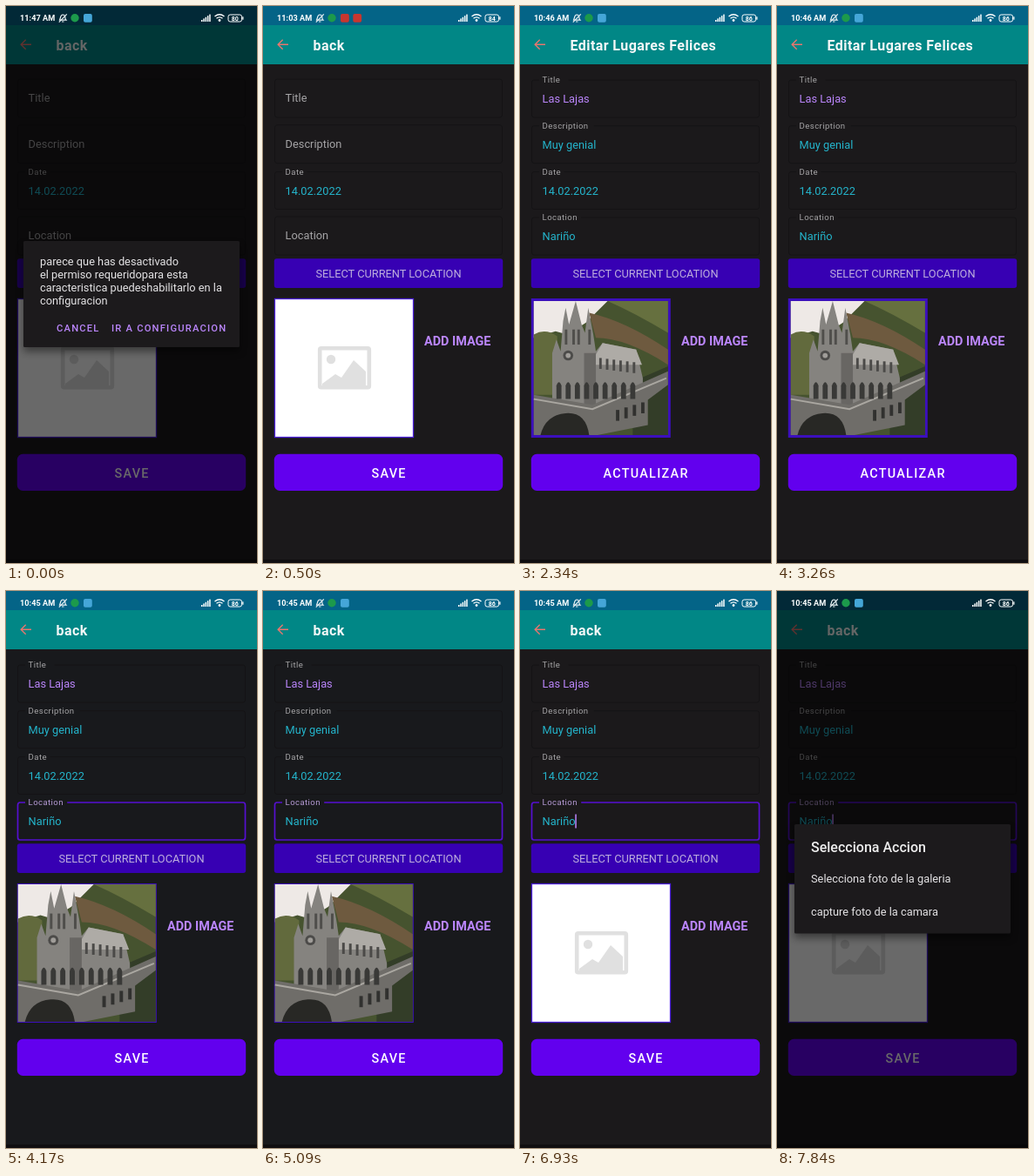
Animation, 288 px wide and 640 px high, one loop 8000 ms. Source, as an HTML page:

```html
<!DOCTYPE html>
<html lang="es">
<head>
<meta charset="utf-8">
<style>
html, body { margin: 0; width: 100%; height: 100%; overflow: hidden; background: #000; }
svg { display: block; }
#stage { width: 288px; height: 640px; font-family: Roboto, sans-serif; }
</style>
</head>
<body>
<svg id="stage" viewBox="0 0 288 640"></svg>
<script>
const LOOP = 8000;
const LILAC = '#bb86fc', CYAN = '#24b4cb', GREY = '#a5a4a6';

const text = (x, y, s, size = 12.8, fill = '#e4e3e5', extra = '') =>
  `<text x="${x}" y="${y}" font-size="${size}" fill="${fill}" ${extra}>${s}</text>`;
const rect = (x, y, w, h, fill, extra = '') =>
  `<rect x="${x}" y="${y}" width="${w}" height="${h}" fill="${fill}" ${extra}/>`;
const circle = (x, y, r, fill) => `<circle cx="${x}" cy="${y}" r="${r}" fill="${fill}"/>`;
const path = (d, fill, extra = '') => `<path d="${d}" fill="${fill}" ${extra}/>`;
const line = (d, stroke, width = 1) => path(d, 'none', `stroke="${stroke}" stroke-width="${width}"`);
const bold = 'font-weight="700"', medium = 'font-weight="500"';

function church() {
  let s = rect(0, 0, 160, 160, '#46532f')
    + path('M0 0H88L62 26 40 40 26 36 0 44Z', '#eee9e6')
    + path('M66 14Q110 24 160 58V76Q110 44 74 44Z', '#6e5a3f')
    + path('M88 0H160V38Q120 14 88 0Z', '#66703f')
    + path('M0 40Q14 32 28 42V112H0Z', '#626a3d')
    + path('M118 96L160 78V160H118Z', '#333d28')
    + path('M22 118V62L27 46 32 60 35 24 38 8 42 28 50 0 57 28 61 38 65 8 71 40 74 60 82 50 122 58 130 92V134H22Z', '#85837f')
    + path('M74 64L82 50 122 58 129 76H74Z', '#aeaba6')
    + path('M60 62H74V134H60Z', '#686663')
    + path('M0 112L70 124 160 84V100L136 118V148L76 160H0Z', '#6f6d69')
    + path('M8 160Q14 136 38 134T66 160Z', '#282825')
    + line('M0 117L70 129 158 92', '#aaa7a1', 2)
    + circle(41, 65, 6, '#4c4b49') + circle(41, 65, 3, '#a09d99');
  for (let i = 0; i < 9; i++)
    s += path(`M${27 + i * 11} 117v-16q3 -8 6 0v16z`, '#393937');
  for (let i = 0; i < 6; i++)
    s += rect(78 + i * 8, 68 + i, 3, 13, '#4b4a48');
  for (let i = 0; i < 4; i++)
    s += rect(98 + i * 10, 130 - i * 3, 4, 13, '#31312f');
  for (const x of [37, 46, 52, 65]) s += rect(x, 34, 3, 18, '#4f4e4b');
  return s;
}

const street = rect(0, 0, 56, 56, '#6b9ed2')
  + path('M4 10Q26 2 46 14L34 20Z', '#b4cfe8')
  + path('M0 24L30 25 34 15 40 22 56 19V44H0Z', '#dcdfe2')
  + path('M0 24L30 25 56 21V23L30 28 0 27Z', '#9c8d86')
  + path('M0 42L56 39V56H0Z', '#8d949c')
  + [6, 16, 26, 35, 44].map(x => rect(x, 31, 2.5, 8, '#868c94')).join('');

const harbour = rect(0, 0, 56, 56, '#3e80cb') + rect(0, 34, 56, 22, '#2d4f7d')
  + [0, 6, 11, 17, 23, 29, 35, 41, 47, 52].map((x, i) =>
      rect(x, 15 + (i * 7) % 13, 4, 24, i % 2 ? '#263d5d' : '#5d7fa8')).join('')
  + path('M0 41Q28 36 56 43V46Q28 40 0 45Z', '#8a7a70') + rect(0, 47, 56, 9, '#1e2f4b');

const statue = rect(0, 0, 56, 56, '#aabccd') + path('M0 32L18 27 38 34 56 28V56H0Z', '#65755a')
  + path('M0 45Q28 37 56 46V56H0Z', '#3f4c35')
  + path('M30 4h4v5h11v4H35l2 34H27l2-34H15V9h15z', '#f1f2f1');

const alley = rect(0, 0, 56, 56, '#d6e2ed')
  + path('M0 4L25 24V38L0 50Z', '#b8722e') + path('M56 2L32 24V38L56 50Z', '#9c4533')
  + path('M0 4L25 24V27L0 14Z', '#6d3a22') + path('M56 2L32 24V27L56 13Z', '#70402a')
  + path('M25 36H32L52 56H4Z', '#b9a084') + path('M0 40L25 34V38L0 54Z', '#276f7d')
  + path('M56 38L32 34V38L56 53Z', '#c99a38')
  + [4, 11, 18].map(x => rect(x, 22 + x / 4, 4, 12, '#5e3826') + rect(49 - x, 22 + x / 4, 4, 12, '#dcc38a')).join('');

const metro = rect(0, 0, 56, 56, '#d5dfe8') + path('M0 24Q28 16 56 22V56H0Z', '#7e9089')
  + [5, 12, 20, 28, 37, 45].map((x, i) => rect(x, 12 + (i * 5) % 9, 6, 24, i % 2 ? '#eceae5' : '#9ca4aa')).join('')
  + path('M0 35Q28 29 56 36V56H0Z', '#4e6248') + line('M4 56Q18 40 54 36', '#24282b', 7)
  + line('M4 53Q18 38 54 34', '#b9bdbd', 1.5);

const defs = `<defs>
  <clipPath id="disc"><circle cx="28" cy="28" r="28"/></clipPath>
  <g id="church">${church()}</g>
  <filter id="soft" x="-20%" y="-20%" width="140%" height="140%"><feGaussianBlur stdDeviation="5"/></filter>
</defs>`;

function status(time, charge, tray) {
  let s = text(16, 17.2, time, 9.2, '#fff', bold)
    + path('M61.5 16.2H69Q67.8 15 67.8 12.5Q67.3 10 65.2 10T62.6 13Z', 'none', 'stroke="#e8eef2" stroke-width="1.2"')
    + line('M60.8 18.6L69.8 9.3M64 18H66.5', '#e8eef2', 1.2) + circle(79, 13.8, 4.7, '#1c9a4b');
  tray.forEach((c, i) => s += rect(89 + i * 14.3, 9, 9.8, 9.8, c, 'rx="2"'));
  for (let i = 0; i < 5; i++)
    s += rect(224 + i * 2.3, 16 - i * 1.6, 1.5, 2 + i * 1.6, '#fff');
  return s + line('M239.5 12Q245 7.5 250.5 12M241.5 14.2Q245 11.4 248.5 14.2', '#fff', 1.3)
    + circle(245, 16.5, 1.4, '#fff')
    + rect(255, 10, 15.5, 8, 'none', 'rx="2.2" stroke="#fff"') + rect(271.3, 12.3, 1.2, 3.4, '#fff')
    + text(262.7, 16.6, charge, 7, '#fff', bold + ' text-anchor="middle"');
}

// Outlined input; the label floats into the border once there is a value.
function field(y, label, value, color, focus) {
  const w = label.length * 4.9 + 9;
  const edge = focus ? '#560fd2' : '#141315';
  if (!value)
    return rect(13.5, y - 1, 261, 44, 'none', `rx="3" stroke="${edge}"`) + text(25.6, y + 25.3, label, 12.8, GREY);
  return line(`M22 ${y}H16Q13.5 ${y} 13.5 ${y + 3}V${y + 40}Q13.5 ${y + 43} 16 ${y + 43}H272Q274.5 ${y + 43} 274.5 ${y + 40}V${y + 3}Q274.5 ${y} 272 ${y}H${22 + w}`, edge, focus ? 1.7 : 1)
    + text(25.6, y + 3.2, label, 9.6, focus ? '#b69bd6' : GREY, 'letter-spacing=".4"')
    + text(25.6, y + 26, value, 12.8, color);
}

const placeholder = rect(13.5, 336.5, 159, 159, '#fff', 'stroke="#4a1fd8" stroke-width="1.3"')
  + rect(65.2, 393.2, 56.6, 45, '#fff', 'rx="1.5" stroke="#e0e0e0" stroke-width="4.6"')
  + circle(78, 406, 5.2, '#e0e0e0')
  + path('M68 434L83 423 90 427 104 407 118 420V436H68Z', '#e0e0e0');

function photo(inset) {
  const k = (160 - 2 * inset) / 160;
  return rect(12.8, 336, 160, 160, '#3c0fbd')
    + `<use href="#church" transform="translate(${12.8 + inset} ${336 + inset}) scale(${k})"/>`;
}

function form(o) {
  const filled = o.filled;
  return rect(0, 0, 288, 640, o.bg || '#1b191b') + rect(0, 0, 288, 22, '#046487') + rect(0, 22, 288, 45, '#018786')
    + line('M29 44.3H17.5M22.7 38.8L17.2 44.3 22.7 49.8', '#e8766f', 1.4)
    + text(57.6, 50.6, o.title || 'back', 16, '#f4f7f7', bold + ' letter-spacing=".4"')
    + field(85, 'Title', filled && 'Las Lajas', LILAC)
    + field(137.7, 'Description', filled && 'Muy genial', CYAN)
    + field(190.5, 'Date', '14.02.2022', CYAN)
    + field(243, 'Location', filled && 'Nariño', CYAN, o.focus)
    + (o.caret ? rect(63.3, 256.5, 1.5, 16, LILAC) : '')
    + rect(12.8, 290.2, 262.4, 33.8, '#3700b3', 'rx="3"')
    + text(144, 312.2, 'SELECT CURRENT LOCATION', 12.8, '#bdaddd', 'text-anchor="middle"')
    + o.image + text(185, 389.5, 'ADD IMAGE', 14.4, LILAC, bold)
    + rect(12.8, 514.8, 262.4, 42.2, '#6200ee', 'rx="6.5"')
    + text(144.6, 541.6, o.button || 'SAVE', 14.4, '#fff', medium + ' text-anchor="middle" letter-spacing="1.28"')
    + rect(0, 636, 288, 4, '#100e10');
}

const dialog = (y, h, content) => rect(0, 0, 288, 640, '#000', 'opacity=".59"')
  + rect(20, y + 5, 248, h, '#000', 'opacity=".45" filter="url(#soft)"')
  + rect(20, y, 248, h, '#1c1a1c', 'rx="1.5"') + content;

function card(y, h, art, title, lines, first) {
  return rect(9, y, 270, h, '#424242', 'rx="2"')
    + `<g transform="translate(13 ${y + h / 2 - 28})" clip-path="url(#disc)">${art}</g>`
    + text(77, first, title, 12.8, '#e2b9f8', bold)
    + lines.map((s, i) => text(77, first + 15.8 + i * 13.2, s, 11.2, '#adadad')).join('');
}

const emoji = circle(140.3, 111.2, 6.5, '#f0bd45') + path('M135.5 111.5H145Q144 116 140.3 116T135.5 111.5Z', '#fff')
  + line('M136 109.5q1.5 -2 3 0M141.6 109.5q1.5 -2 3 0M135.5 113.2H145', '#6d4b1e', .8);

const list = rect(0, 0, 288, 640, '#000') + rect(0, 0, 288, 22, '#3700b3') + rect(0, 22, 288, 45, '#121113')
  + text(13, 50.6, 'Instantes Gratos', 16, '#ececec', medium)
  + card(70, 64, '<use href="#church" transform="scale(.35)"/>', 'Las Lajas', ['Muy genial'], 99.3) + emoji
  + card(140.4, 64, street, 'Popayán', ['Hermosa más conocidas como la', 'ciudad blanca ( mi tierra natal)'], 163.4)
  + card(210.8, 64, harbour, 'Cartagena&#160; De Indias', ['Una ciudad muy bonita más conocida', 'como la ciudad amurallada'], 233.8)
  + card(281.2, 64, statue, 'Cali', ['La capital del valle del Cauca, más', 'conocida como la sucursal del cielo'], 304.2)
  + card(351.6, 80, alley, 'Guatapé', ['Es uno de los pueblos más coloridos', 'de Colombia, un pueblito paisa que',
      'entremezcla su tradición campesina', 'con la historia indígena'], 369.2)
  + card(438, 64, metro, 'Medellín', ['La ciudad de la eterna primavera'], 467.2)
  + circle(252.8, 604.8, 22.4, '#04594c') + line('M247.2 604.8H258.4M252.8 599.2V610.4', '#fff', 1.6)
  + rect(0, 636, 288, 4, '#0c0c0c');

const permission = dialog(270, 122,
  ['parece que has desactivado', 'el permiso requeridopara esta', 'caracteristica puedeshabilitarlo en la', 'configuracion']
    .map((s, i) => text(39, 298 + i * 15.1, s)).join('')
  + text(58, 374, 'CANCEL', 11.2, LILAC, medium + ' letter-spacing="1.2"')
  + text(121, 374, 'IR A CONFIGURACION', 11.2, LILAC, medium + ' letter-spacing="1.2"'));

const picker = dialog(268, 125.5, text(39, 299.8, 'Selecciona Accion', 16, '#ededed', medium)
  + text(39, 334.5, 'Selecciona foto de la galeria') + text(39, 373, 'capture foto de la camara'));

const blue = ['#45a6d8'], red = ['#c8362f', '#c8362f'];
const blank = form({ image: placeholder });
const noPhoto = form({ filled: true, focus: true, caret: true, image: placeholder });

// [start in ms, markup]
const scenes = [
  [0, blank + permission + status('11:47 AM', '80', blue)],
  [500, blank + status('11:03 AM', '84', red)],
  [1420, list + status('11:03 AM', '84', red)],
  [2340, form({ filled: true, title: 'Editar Lugares Felices', button: 'ACTUALIZAR', image: photo(3) }) + status('10:46 AM', '86', blue)],
  [4170, form({ filled: true, focus: true, bg: '#18191c', image: photo(1) }) + status('10:45 AM', '86', blue)],
  [6930, noPhoto + status('10:45 AM', '86', blue)],
  [7840, noPhoto + picker + status('10:45 AM', '86', blue)]
];

const stage = document.getElementById('stage');
stage.innerHTML = defs + scenes.map(s => `<g class="scene" display="none">${s[1]}</g>`).join('');
const groups = [...stage.querySelectorAll('.scene')];
const begin = performance.now();
let shown = -1;

function draw() {
  const t = (performance.now() - begin) % LOOP;
  const now = scenes.filter(s => s[0] <= t).length - 1;
  if (now !== shown) {
    groups.forEach((g, i) => g.setAttribute('display', i === now ? 'inline' : 'none'));
    shown = now;
  }
  requestAnimationFrame(draw);
}
draw();
</script>
</body>
</html>
```
